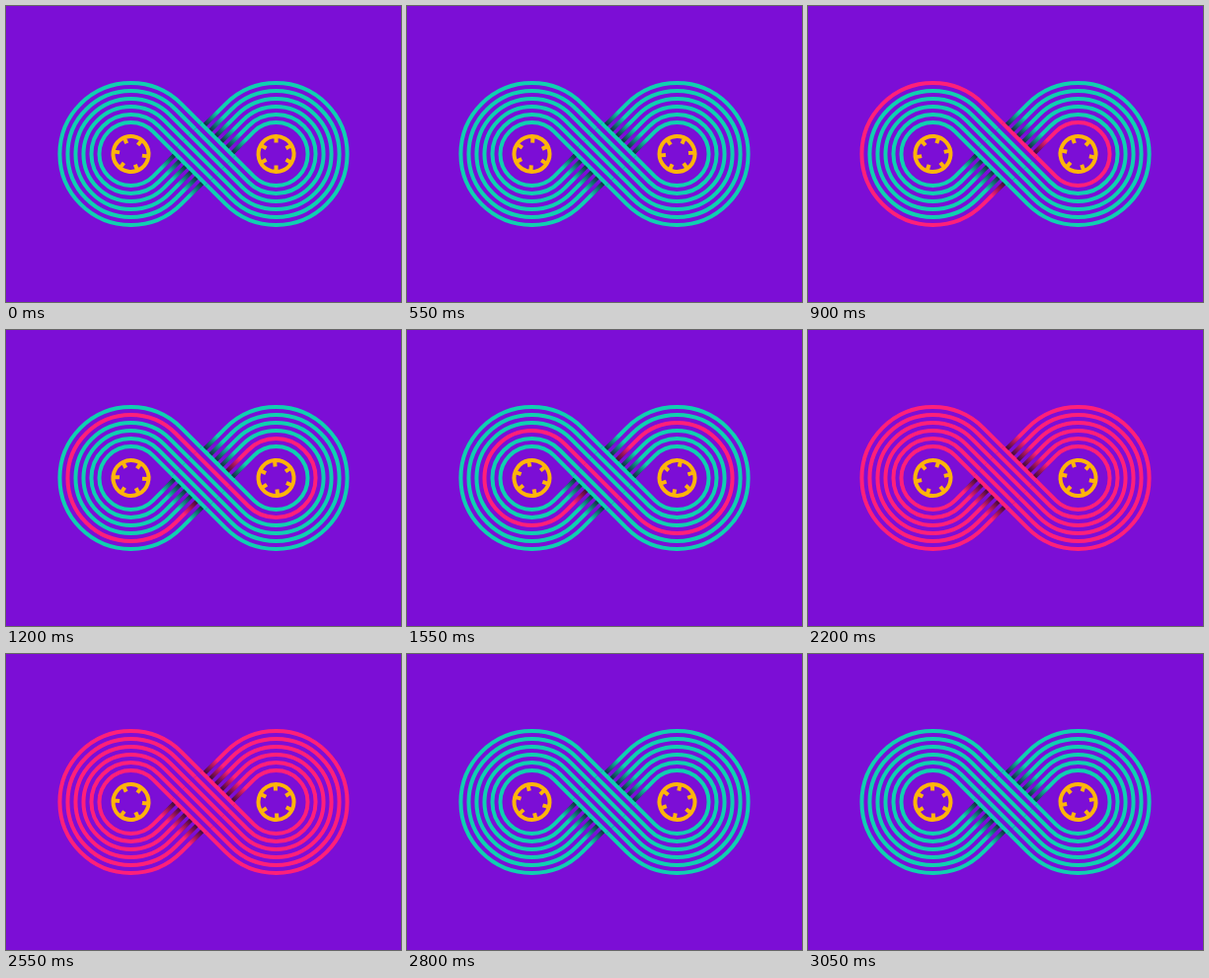
These frames come from a looping animation (400 by 300 pixels, 3.1 s). An HTML page:

```html
<!DOCTYPE html>
<html lang="en">
<head>
<meta charset="utf-8">
<title>Endless tape</title>
<style>
html, body { margin: 0; width: 100%; height: 100%; overflow: hidden; background: #7c0ed6; }
svg { display: block; width: 100vw; height: 100vh; }
</style>
</head>
<body>
<svg id="stage" viewBox="0 0 400 300" fill="none" stroke-width="4">
  <defs>
    <linearGradient id="shade" gradientUnits="userSpaceOnUse" x1="-40" y1="0" x2="40" y2="0">
      <stop offset="0" stop-color="#12062a" stop-opacity="0"/>
      <stop offset=".225" stop-color="#12062a" stop-opacity=".8"/>
      <stop offset=".775" stop-color="#12062a" stop-opacity=".8"/>
      <stop offset="1" stop-color="#12062a" stop-opacity="0"/>
    </linearGradient>
  </defs>
  <g id="loops"></g>
  <g id="shadow" transform="translate(200 150) rotate(-45)" fill="url(#shade)"></g>
  <g id="front" transform="translate(200 150) rotate(45)">
    <rect x="-24" y="-21.5" width="48" height="43" fill="#7c0ed6"/>
  </g>
  <g id="reels" stroke="#ffb40a"></g>
</svg>
<script>
const LOOP = 3100, TEAL = '#0fd0b0', PINK = '#ff2079';
const K = Math.SQRT1_2, MID = 52, HALF = MID / K;
const LEFT = 200 - HALF, RIGHT = 200 + HALF;
const SPIN = 46;                 // degrees per second
const FIRST = 624, BEAT = 213;   // colour changes run on a steady beat
const BEATS = ['all', 0, 1, 2, 3, 4, 5, 'all', 'none', 'all'];

function add(parent, tag, attrs) {
  const el = document.createElementNS('http://www.w3.org/2000/svg', tag);
  for (const name in attrs) el.setAttribute(name, attrs[name]);
  return document.getElementById(parent).appendChild(el);
}

function loopPath(r) {
  const q = 2 * MID - r, a = r * K, b = q * K;
  return `M${LEFT + a} ${150 - a} A${r} ${r} 0 1 0 ${LEFT + a} ${150 + a}
    L${RIGHT - b} ${150 - b} A${q} ${q} 0 1 1 ${RIGHT - b} ${150 + b} Z`;
}

const strands = Array.from({ length: 6 }, (_, i) => {
  const r = 72 - 8 * i, off = MID - r;
  add('shadow', 'rect', { x: -40, y: -off - 2.2, width: 80, height: 4.4 });
  return [
    add('loops', 'path', { d: loopPath(r) }),
    add('front', 'path', { d: `M-24 ${off}H24` })
  ];
});

function makeReel(x, phase) {
  let d = 'M18 0A18 18 0 1 1 -18 0A18 18 0 1 1 18 0Z';
  for (let i = 0; i < 6; i++) {
    const c = Math.cos(i * Math.PI / 3), s = Math.sin(i * Math.PI / 3);
    d += `M${17 * c} ${17 * s}L${11.5 * c} ${11.5 * s}`;
  }
  return { x, phase, el: add('reels', 'path', { d }) };
}
const reels = [makeReel(LEFT, 8), makeReel(RIGHT, 30)];

function draw(t) {
  const lit = BEATS[Math.floor((t - FIRST) / BEAT)];
  strands.forEach((parts, i) => {
    const color = lit === 'all' || lit === i ? PINK : TEAL;
    parts.forEach(p => p.setAttribute('stroke', color));
  });
  for (const { x, phase, el } of reels)
    el.setAttribute('transform', `translate(${x} 150) rotate(${phase + SPIN * t / 1000})`);
}

const start = performance.now();
function tick() {
  draw((performance.now() - start) % LOOP);
  requestAnimationFrame(tick);
}
draw(0);
requestAnimationFrame(tick);
</script>
</body>
</html>
```
